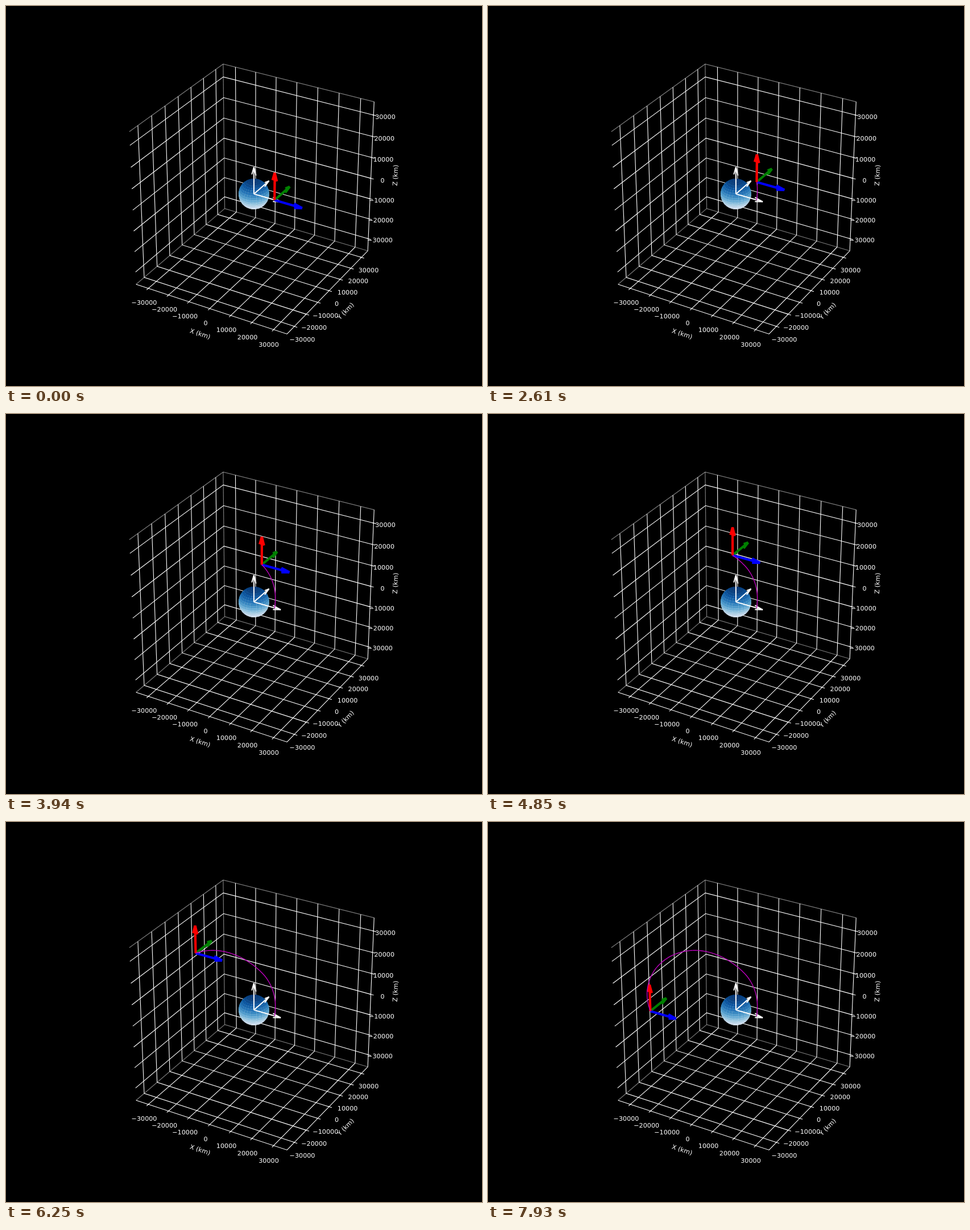
Animation, 837 px wide and 669 px high, one loop 8000 ms. Source, as an HTML page with a canvas:

```html
<!DOCTYPE html>
<html lang="en">
<head>
<meta charset="utf-8">
<title>Orbit</title>
<style>
html, body { margin: 0; width: 100%; height: 100%; overflow: hidden; background: #000; }
canvas { display: block; }
</style>
</head>
<body>
<canvas id="stage" width="837" height="669"></canvas>
<script>
const W = 837, H = 669, LOOP = 8000;
const ctx = document.getElementById('stage').getContext('2d');

// Camera: azimuth -60, elevation 30, looking at a unit cube.
const CX = 435.9, CY = 330.9, SCALE = 2784.5, DIST = 9.0888;
const SPAN = 72290;
const EARTH = 6371 / SPAN;

const depth = ([x, y, z]) => DIST - 0.433 * x + 0.75 * y - 0.5 * z;

function project(p) {
  const [x, y, z] = p, k = SCALE / depth(p);
  return [CX + (0.866 * x + 0.5 * y) * k, CY - (-0.25 * x + 0.433 * y + 0.866 * z) * k];
}

// Place a screen point on the orbit plane, which holds the x axis.
const TILT = 80 * Math.PI / 180, CT = Math.cos(TILT), ST = Math.sin(TILT);
function unproject([sx, sy]) {
  const X = (sx - CX) / SCALE, Y = (CY - sy) / SCALE;
  const dq = 0.75 * CT - 0.5 * ST;
  const a = 0.866 + 0.433 * X, b = 0.5 * CT - X * dq;
  const c = -0.25 + 0.433 * Y, d = 0.433 * CT + 0.866 * ST - Y * dq;
  const det = a * d - b * c;
  const x = DIST * (X * d - Y * b) / det, q = DIST * (a * Y - c * X) / det;
  return [x, q * CT, q * ST];
}

function stroke(g, points, color, width) {
  g.strokeStyle = color;
  g.lineWidth = width;
  g.beginPath();
  points.forEach(([x, y], i) => i ? g.lineTo(x, y) : g.moveTo(x, y));
  g.stroke();
}
const stroke3 = (g, points, color, width) => stroke(g, points.map(project), color, width);

// Arrow along one axis with two head barbs at 15 degrees.
function arrow(g, from, axis, length, color, width) {
  const at = (along, side) => {
    const p = from.slice();
    p[axis] += along;
    p[axis === 2 ? 0 : 2] += side;
    return p;
  };
  const tip = at(length, 0), barb = 0.3 * length, ang = Math.PI / 12;
  stroke3(g, [from, tip], color, width);
  for (const s of [-1, 1]) {
    stroke3(g, [tip, at(length - barb * Math.cos(ang), s * barb * Math.sin(ang))], color, width);
  }
}

const BLUES = ['f7fbff', 'deebf7', 'c6dbef', '9ecae1', '6baed6', '4292c6', '2171b5', '08519c', '08306b']
  .map(h => [0, 2, 4].map(i => parseInt(h.substr(i, 2), 16)));
function blues(v) {
  const u = Math.max(0, Math.min(1, v)) * 8, i = Math.min(7, Math.floor(u)), f = u - i;
  return `rgb(${BLUES[i].map((c, j) => Math.round(c + (BLUES[i + 1][j] - c) * f))})`;
}

function sphere(g) {
  const LON = 29, LAT = 19, faces = [];
  const vertex = (i, j) => {
    const a = 2 * Math.PI * i / LON, b = Math.PI * j / LAT;
    return [Math.cos(a) * Math.sin(b), Math.sin(a) * Math.sin(b), Math.cos(b)].map(v => v * EARTH);
  };
  for (let i = 0; i < LON; i++) {
    for (let j = 0; j < LAT; j++) {
      const pts = [vertex(i, j), vertex(i + 1, j), vertex(i + 1, j + 1), vertex(i, j + 1)];
      const mean = f => pts.reduce((s, p) => s + f(p), 0) / 4;
      faces.push({ pts, far: mean(depth), z: mean(p => p[2]) / EARTH });
    }
  }
  faces.sort((a, b) => b.far - a.far);
  for (const { pts, z } of faces) {
    g.fillStyle = blues((z + 1) / 2);
    g.beginPath();
    pts.map(project).forEach(([x, y], k) => k ? g.lineTo(x, y) : g.moveTo(x, y));
    g.fill();
  }
}

function label(g, text, x, y, angle = 0) {
  g.save();
  g.translate(x, y);
  g.rotate(angle * Math.PI / 180);
  g.fillText(text, 0, 4);
  g.restore();
}

// Label centres at the low, middle and high tick of each axis.
const TICKS = [
  [[243, 522], [351, 558], [462, 596]],
  [[521, 587], [581.5, 524], [637.5, 464.5]],
  [[657.5, 411.5], [662, 306.5], [667, 195]]
];

function axes(g) {
  const h = 0.5, OUT = 0.018, IN = 0.009;
  const grey = 'rgba(242,242,242,0.5)';
  const low = [[-h, -h, -h], [-h, h, -h], [h, h, -h]];
  const top = low.map(([x, y]) => [x, y, h]);
  stroke3(g, low, grey, 1.2);
  stroke3(g, top, grey, 1.2);
  stroke3(g, [low[1], top[1]], grey, 1.2);

  g.font = '11.2px "DejaVu Sans", sans-serif';
  g.textAlign = 'center';
  g.fillStyle = '#fff';
  for (let i = -3; i <= 3; i++) {
    const v = i * 10000 / SPAN, n = i / 3;
    const lines = [
      [[v, -h, -h], [v, h, -h], [v, h, h]],
      [[h, v, -h], [-h, v, -h], [-h, v, h]],
      [[-h, -h, v], [-h, h, v], [h, h, v]]
    ];
    const ticks = [
      [[v, -h - OUT, -h], [v, -h + IN, -h]],
      [[h + OUT, v, -h], [h - IN, v, -h]],
      [[h + OUT, h, v], [h - IN, h, v]]
    ];
    lines.forEach(l => stroke3(g, l, '#fff', 1.1));
    ticks.forEach(l => stroke3(g, l, '#fff', 1.1));
    TICKS.forEach(([a, m, b]) => {
      const [x, y] = [0, 1].map(k => m[k] + (b[k] - a[k]) / 2 * n + (a[k] + b[k] - 2 * m[k]) / 2 * n * n);
      label(g, String(i * 10000).replace('-', '\u2212'), x, y);
    });
  }
  stroke3(g, [[-h, -h, -h], [h, -h, -h], [h, h, -h], [h, h, h]], '#fff', 1.1);
  label(g, 'X (km)', 341.5, 577, 18.1);
  label(g, 'Y (km)', 597, 537, -45.8);
  label(g, 'Z (km)', 684.5, 298, -87.6);
}

// Cubic Hermite curve through (xs, ys) with the given slopes.
function hermite(xs, ys, slopes, x) {
  let i = 0;
  while (i < xs.length - 2 && x > xs[i + 1]) i++;
  const w = xs[i + 1] - xs[i], t = (x - xs[i]) / w, u = 1 - t;
  return ys[i] * (1 + 2 * t) * u * u + ys[i + 1] * t * t * (3 - 2 * t)
    + w * (slopes[i] * t * u * u - slopes[i + 1] * t * t * u);
}

function curve(xs, ys, monotone) {
  const n = xs.length, w = [], d = [];
  for (let i = 0; i < n - 1; i++) {
    w.push(xs[i + 1] - xs[i]);
    d.push((ys[i + 1] - ys[i]) / w[i]);
  }
  const slopes = xs.map((_, i) => {
    if (i === 0) return monotone ? 0 : d[0] * 1.5 - d[1] * 0.5;
    if (i === n - 1) return d[n - 2];
    const a = w[i - 1], b = w[i];
    if (!monotone) return (d[i - 1] * b + d[i] * a) / (a + b);
    return 3 * (a + b) / ((2 * b + a) / d[i - 1] + (b + 2 * a) / d[i]);
  });
  return x => hermite(xs, ys, slopes, x);
}

const ORBIT = [
  [472.2, 341.8], [473.7, 326], [472.5, 310], [465.2, 287], [455, 271], [449.7, 265.2],
  [431, 249.3], [410, 237], [382, 227.8], [363, 226], [350.5, 227], [318, 238],
  [291.5, 263], [281.5, 287], [279.7, 305], [281.8, 321], [285.5, 333]
];
const chord = [0];
for (let i = 1; i < ORBIT.length; i++) {
  chord.push(chord[i - 1] + Math.hypot(ORBIT[i][0] - ORBIT[i - 1][0], ORBIT[i][1] - ORBIT[i - 1][1]));
}
const pathX = curve(chord, ORBIT.map(p => p[0]));
const pathY = curve(chord, ORBIT.map(p => p[1]));
const onPath = s => [pathX(s), pathY(s)];

// Distance flown after each number of steps; slow starts at 0 and 50.
const FLOWN = [
  [0, 0], [12, 0.8], [21, 3], [24, 5], [35, 31.9], [36, 34.4], [48, 75], [50, 82],
  [54, 82.8], [60, 86.4], [72, 131.8], [78, 161.2], [84, 192.8], [96, 263.5],
  [108, 323.7], [111, 336.3]
];
const flown = curve(FLOWN.map(p => p[0]), FLOWN.map(p => p[1]), true);

const scene = document.createElement('canvas');
scene.width = W;
scene.height = H;
(function drawScene(g) {
  g.fillStyle = '#000';
  g.fillRect(0, 0, W, H);
  axes(g);
  sphere(g);
  for (const axis of [1, 0, 2]) arrow(g, [0, 0, 0], axis, 2 * EARTH, '#fff', 2);
})(scene.getContext('2d'));

const FRAME = [[1, '#008000'], [0, '#0000ff'], [2, '#ff0000']];

function draw(ms) {
  const step = Math.max(0, Math.min(111, Math.floor((ms - 160) / 70)));
  const s = flown(step), here = onPath(s);
  ctx.drawImage(scene, 0, 0);
  const base = unproject(here);
  for (const [axis, color] of FRAME) arrow(ctx, base, axis, 0.179, color, 4.17);
  const trail = [];
  for (let d = 0; d < s; d += 2) trail.push(onPath(d));
  trail.push(here);
  if (trail.length > 1) stroke(ctx, trail, '#bf00bf', 1.39);
}

const start = performance.now();
function tick() {
  draw((performance.now() - start) % LOOP);
  requestAnimationFrame(tick);
}
tick();
</script>
</body>
</html>
```
